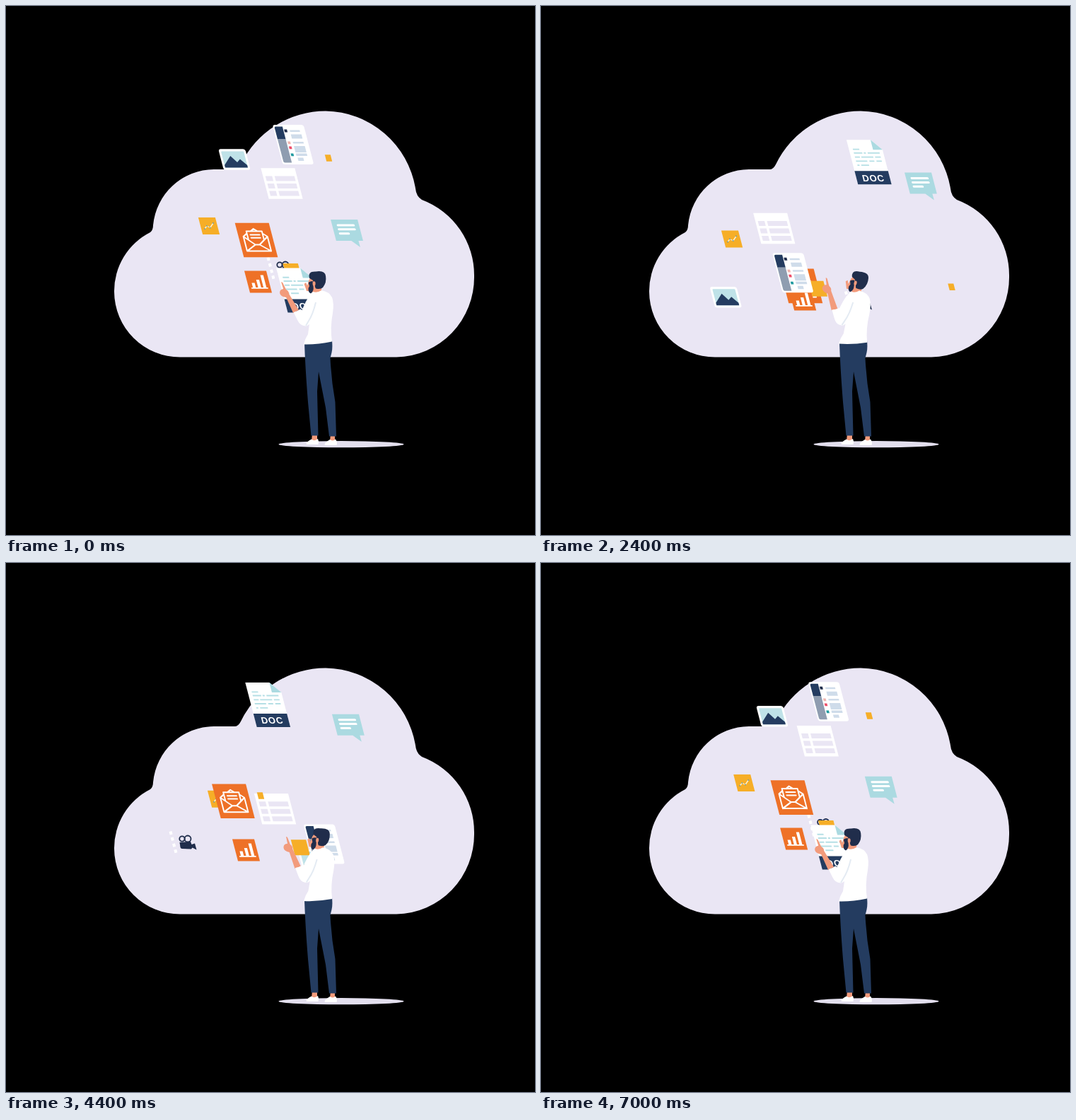
These frames come from a looping animation (748x748 px, 7.04 s). An HTML page:

```html
<!DOCTYPE html>
<html lang="en">
<head>
<meta charset="utf-8">
<title>Files in the cloud</title>
<style>
  html, body { margin: 0; width: 100%; height: 100%; overflow: hidden; background: #000; }
  svg { display: block; width: 100vw; height: 100vh; }
  .white { fill: #fff; }
  .navy { fill: #243c60; }
  .hair { fill: #202d4b; }
  .aqua { fill: #abdae1; }
  .amber { fill: #f6ae27; }
  .orange { fill: #ee7127; }
  .skin { fill: #f29b7c; }
  .pale { fill: #cfdcea; }
  .line { fill: none; stroke: #fff; stroke-width: 2; stroke-linejoin: round; stroke-linecap: round; }
  .thick { stroke-width: 3; }
  text { font: bold 13px "Liberation Sans", Arial, sans-serif; letter-spacing: .8px; text-anchor: middle; }
</style>
</head>
<body>
<svg viewBox="0 0 748 748">
  <path fill="#eae6f4" d="M246 496.500A93 93 0 0 1 153 404A93 93 0 0 1 204 320Q208 317 208 310A87 87 0 0 1 294 231H322Q328 232 332 224A133 133 0 0 1 452 148.500A131 131 0 0 1 579 258Q580 269 588 274A114 114 0 0 1 662 382A112 113 0 0 1 552 496.500Z"/>
  <ellipse cx="474" cy="619.700" rx="88.500" ry="4.600" fill="#e3dfee"/>

  <g id="camera">
    <path d="M-24.500-15.500L-16.500 15" fill="none" stroke="#fff" stroke-width="4" stroke-dasharray="4.600 4.300"/>
    <g fill="none" stroke="#202d4b" stroke-width="1.800">
      <circle cx="-8" cy="-5" r="3.700"/><circle cx="0" cy="-5" r="4.500"/>
    </g>
    <path class="hair" d="M-11.500 0L4-1L5.500 3L10 1.500L12.500 10.500L6.500 7.500L5 9.500L-8 9Q-10 9-10.500 7Z"/>
  </g>

  <g id="chart">
    <rect class="amber" x="-12" y="-12" width="24" height="24"/>
    <path d="M-7 4L-3 0L1 2.500L7-4" fill="none" stroke="#fff3d6" stroke-width="1.300"/>
    <path d="M-7 4h0M-3 0h0M1 2.500h0M7-4h0" stroke="#6f9a9c" stroke-width="2" stroke-linecap="round"/>
  </g>

  <path id="table" class="white" fill-rule="evenodd" d="M-24-21.700h48v43.500h-48zM-20.500-10.500h9.500v7h-9.500zM-7.500-10.500h28v7h-28zM-20.500 0h9.500v7h-9.500zM-7.500 0h28v7h-28zM-20.500 10.500h9.500v7h-9.500zM-7.500 10.500h28v7h-28z"/>

  <g id="picture">
    <rect class="white" x="-19" y="-14.700" width="38" height="29.400" rx="3.500"/>
    <rect x="-16" y="-11.500" width="32" height="23" rx="1" fill="#bfe2e8"/>
    <path class="navy" d="M-16 11.500V8L-4.500-5L3 4L8-.5L16 8V11.500Z"/>
  </g>

  <rect id="spark" class="amber" x="-4" y="-4.700" width="8" height="9.400"/>

  <g id="mail">
    <rect class="orange" x="-24" y="-24.300" width="48" height="48.600"/>
    <path class="line" d="M-17-5V15.500H17V-5L3 6.500H-3ZM-17 15.500L-3 6.500M17 15.500L3 6.500M-17-5L-11-9.500M17-5L11-9.500M-5-12.500L0-16L5-12.500M-11-.5V-12.500H11V-.5M-6.500-7.500H6.500M-6.500-3.200H6.500"/>
  </g>

  <g id="bars">
    <rect class="orange" x="-15.500" y="-15.500" width="31" height="31"/>
    <path class="white" d="M-11.700 8h23.500v1.700h-23.500zM-9.500 1.500h4.200v7h-4.200zM-2-3h4.200v11h-4.200zM5.500-9.500h4.200v18h-4.200z"/>
  </g>

  <rect id="note" class="amber" x="-10.700" y="-11" width="21.400" height="22"/>

  <g id="chat">
    <path class="aqua" d="M-19-15H19V15H12.500L12.700 24L2.500 15H-19Z"/>
    <path class="line thick" d="M-11-7H11.500M-11-1.200H11.500M-11 4.700H1.500"/>
  </g>

  <g id="doc">
    <path class="white" d="M-23.700-31.500H10.300L23.700-17.500V31.500H-23.700Z"/>
    <path class="aqua" d="M10.300-31.500L23.700-17.500H10.300Z"/>
    <path fill="none" stroke="#b5dfe5" stroke-width="1.900" d="M-18-18.200h9M-18-13h12M-4-13h3M1.500-13h17M-18-7.200h7M-9-7.200h17M10.500-7.200h8M-18-1.500h16M1-1.500h7M11-1.500h7.500M-17.500 4.300h3M-12 4.300h11"/>
    <rect class="navy" x="-23.700" y="12.500" width="47.400" height="19"/>
    <text class="white" x=".4" y="26.700">DOC</text>
  </g>

  <g id="panel">
    <rect class="white" x="-22" y="-28" width="44" height="56" rx="3.500"/>
    <path class="navy" d="M-20-23.500Q-20-25.500-18-25.500H-8.500V-7.500H-20Z"/>
    <path fill="#8f9db0" d="M-20-7.500H-8.500V25.500H-18Q-20 25.500-20 23.500Z"/>
    <path class="pale" d="M.5-20.500h14v2.500H.5zM.5-14.500h15v6H.5zM.5-4h15v2.500H.5zM.5 2h15.500v9H.5zM.5 12.500h15.500v3.500H.5zM1.500 18.500h8v4.500h-8z"/>
    <rect class="hair" x="-7.300" y="-21.500" width="4" height="4"/>
    <rect fill="#f0b4ae" x="-6.800" y="-4.500" width="3.800" height="3.800"/>
    <rect fill="#ee4d68" x="-6.800" y="2.500" width="3.800" height="3.800"/>
    <rect fill="#1f9a9f" x="-6.800" y="12.500" width="3.800" height="3.800"/>
  </g>

  <path class="skin" d="M433 605H440V615H432ZM459 605H465V615H458Z"/>
  <path class="white" d="M424.500 619Q425 616 432 612.500Q436 616 441 612Q443 616 441.500 620H425ZM450.500 619.500Q451 617 458 613Q462 616 466 612.500Q469 617 467.500 621H451Z"/>
  <path class="navy" d="M422 476L461 473Q462 484 460.500 490L458.500 498Q460 530 465.500 560L467 608.500H457L452 568L442 517L440 545L441.500 607.500H431.500L427 560Q423 510 422 476Z"/>

  <g id="torso">
    <g id="head">
      <path class="skin" d="M421.500 393L424 391L426 396L428 388L433 380H442L446 396V406H433V398L429 403L425 403Z"/>
      <path class="hair" d="M429 385Q426 375 438 375.500Q451 373.500 452 382Q453.500 391 448 398Q445 401 438 399.500Q436 397 437 391Q434 393 434 388Z"/>
      <path class="hair" d="M427.500 391Q430 389 433.500 389L434.500 397Q435.500 403 431 406.500Q427 405 427.500 399L429 396Z"/>
      <ellipse class="skin" cx="435.500" cy="392.500" rx="2" ry="3.200"/>
    </g>
    <g id="forearm">
      <path class="skin" d="M389 390.500Q391 390 392 393L396 401Q400 403 400 407L414 430L406 434L396 412Q388 411 387 406Q386.500 401 392 400Z"/>
      <path class="white" d="M406.500 433Q412 432 416 428.500L429 436L422 452Q416 452 412 444Z"/>
    </g>
    <path class="white" d="M434 404Q440 406 446 402Q457 404 461 412Q464 420 462 434Q458 455 461 474.500Q440 479 421 478.500Q423 470 427 464L429 450Q424 455 418.500 450L416 438Q420 424 428 411Z"/>
    <path d="M438 419Q434 436 427.500 446L424 452" fill="none" stroke="#e4ebf3" stroke-width="2"/>
  </g>
</svg>

<script>
const LOOP = 7040, STEP = 40, SLANT = 14.6;
const TURN = 2 * Math.PI;
const $ = id => document.getElementById(id);

// Ellipse given by its centre and the offsets at the start and a quarter turn later.
// The motion slows down `pulls` times per turn, by the amount `ease`.
function orbit(turns, centre, start, quarter, ease = 0, pulls = 1) {
  return t => {
    const steady = TURN * turns * t / LOOP;
    const angle = steady - ease * Math.sin(pulls * steady);
    return centre.map((c, i) => c + start[i] * Math.cos(angle) + quarter[i] * Math.sin(angle));
  };
}

const fileRoute = orbit(1, [410, 299], [-4, -103], [-96, -8], 0.4, 2);

const paths = {
  camera: orbit(2, [367, 401], [28, -30], [-110, -6]),
  spark: orbit(2, [472, 338], [-16, -123], [-112, -9]),
  mail: orbit(2, [336, 382], [18, -51], [-30, -20], 0.6),
  bars: orbit(2, [355.5, 407], [1, -17], [-16, -1]),
  chart: orbit(1, [286, 327], [1, -16], [-16, 0], 0.49),
  note: orbit(1, [405, 391], [0, -16], [-16, 0]),
  chat: orbit(1, [498, 269], [-16, 48], [36, 9]),
  table: orbit(1, [370, 301], [20, -50], [-35, -16]),
  picture: orbit(1, [343, 339], [-20, -122], [-110, 8]),
  doc: t => fileRoute(t + LOOP / 2),
  panel: fileRoute
};

// The panel shrinks on its way back up.
const panelScale = t => 1 - 0.18 * Math.sin(Math.PI * Math.max(0, t - 4400) / (LOOP - 4400));

function draw(t) {
  for (const id in paths) {
    const [x, y] = paths[id](t);
    const skew = id === "camera" ? 0 : SLANT;
    const scale = id === "panel" ? panelScale(t) : 1;
    $(id).setAttribute("transform", `translate(${x} ${y}) scale(${scale}) skewX(${skew})`);
  }
  const lean = (1 - Math.cos(2 * TURN * (t - 100) / LOOP)) / 2;
  $("torso").setAttribute("transform", `rotate(${4 * lean} 440 478)`);
  $("head").setAttribute("transform", `translate(${3 * lean} 0) rotate(${12 * lean} 442 404)`);
  $("forearm").setAttribute("transform", `rotate(${10.5 * lean} 421 448)`);
}

const begin = performance.now();
function tick() {
  const t = (performance.now() - begin) % LOOP;
  draw(Math.floor(t / STEP) * STEP);
  requestAnimationFrame(tick);
}
tick();
</script>
</body>
</html>
```
